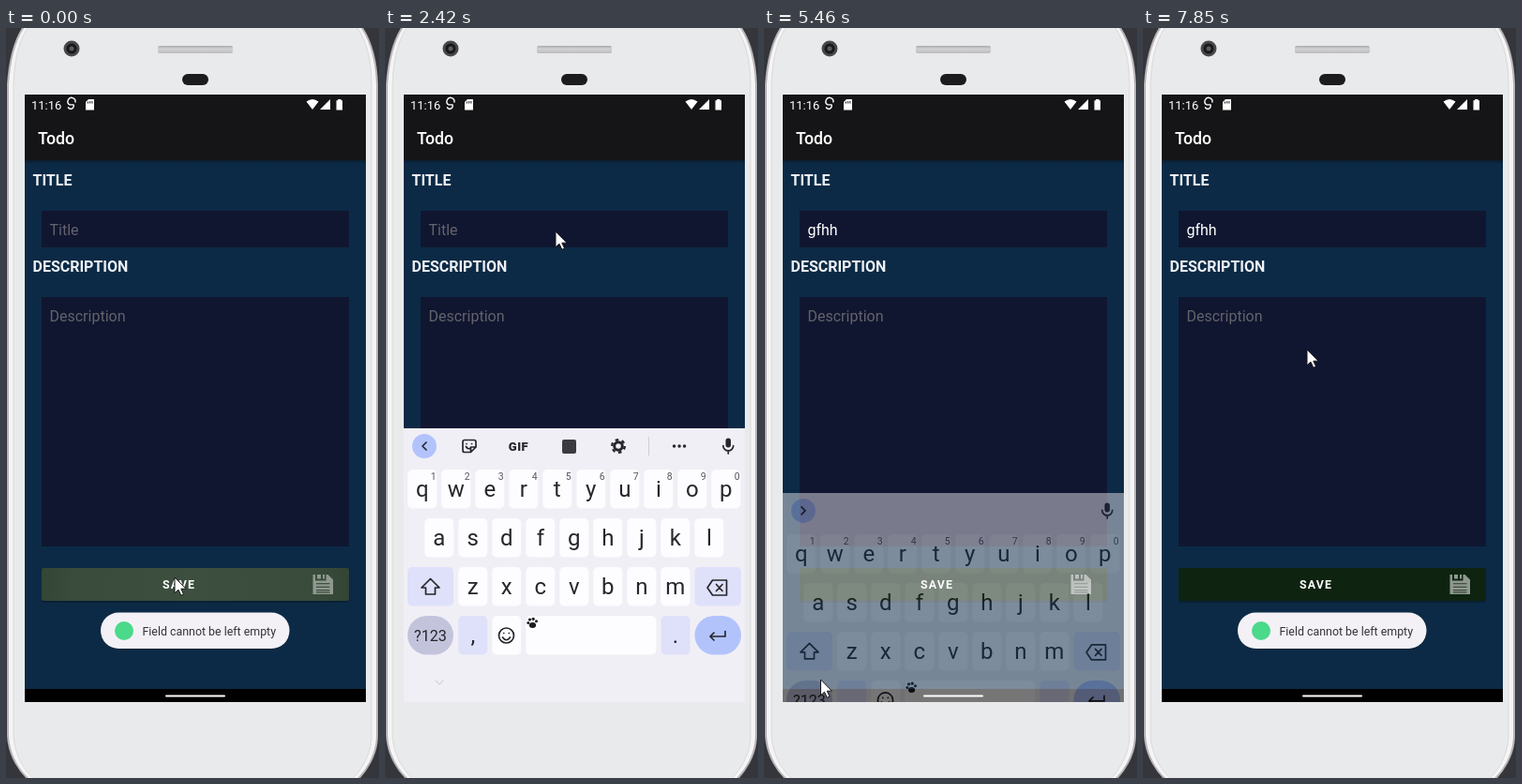
Recreate the animation shown at these times as an HTML page. Size 398 by 800 pixels, loop 8000 ms.

```html
<!DOCTYPE html>
<html lang="en">
<head>
<meta charset="utf-8">
<title>Todo form</title>
<style>
  html, body { margin: 0; width: 100%; height: 100%; overflow: hidden; background: #34363b; }
  svg { display: block; width: 100%; height: 100%; }
  text { font-family: Roboto, "Noto Sans", sans-serif; font-size: 16px; white-space: pre; }
  .mid { text-anchor: middle; }
  .line { fill: none; stroke: #26262b; stroke-width: 1.7; stroke-linejoin: round; stroke-linecap: round; }
  #keys .key { font-size: 24px; }
  #keys .hint { font-size: 10.5px; fill: #55555c; }
</style>
</head>
<body>
<svg viewBox="0 0 398 800" preserveAspectRatio="none">
  <defs>
    <clipPath id="screen"><path d="M20 71H384V719H20Z"/></clipPath>
    <linearGradient id="slot" x2="0" y2="1">
      <stop stop-color="#a9a9ac"/><stop offset=".4" stop-color="#d2d2d4"/><stop offset="1" stop-color="#bcbcbf"/>
    </linearGradient>
    <linearGradient id="shade" x2="0" y2="1">
      <stop stop-color="#000" stop-opacity=".3"/><stop offset="1" stop-color="#000" stop-opacity="0"/>
    </linearGradient>
    <radialGradient id="glow" gradientUnits="userSpaceOnUse" cx="200" cy="594" r="190">
      <stop stop-color="#fff" stop-opacity=".24"/><stop offset=".5" stop-color="#fff" stop-opacity=".22"/>
      <stop offset="1" stop-color="#fff" stop-opacity=".1"/>
    </radialGradient>
  </defs>

  <!-- phone -->
  <path d="M2 60C4 30 10 8 24-8H374C388 8 395 30 396 60V755C396 775 384 795 370 806H30C14 795 3 775 2 755Z" fill="#f5f5f6" stroke="#b9b5b8" stroke-width="2"/>
  <path d="M8 60C9 30 15 8 29-8H369C383 8 390 30 390 60V755C390 775 378 795 364 806H36C20 795 9 775 8 755Z" fill="#e9eaec" stroke="#d9d9dc"/>
  <circle cx="70" cy="22" r="8.5" fill="#48484b"/>
  <circle cx="70" cy="22" r="5.5" fill="#19191c"/>
  <circle cx="70" cy="22" r="2.5" fill="#5b5b62"/>
  <rect x="162" y="19" width="80" height="8" rx="2" fill="url(#slot)"/>
  <rect x="188" y="49" width="28" height="12" rx="6" fill="#1c1b1e"/>

  <g clip-path="url(#screen)">
    <path d="M20 71H384V719H20Z" fill="#0c2a45"/>
    <path d="M20 71H384V141H20Z" fill="#151517"/>
    <path d="M20 141H384V145H20Z" fill="url(#shade)"/>

    <!-- status bar -->
    <g fill="#fff">
      <text x="27" y="86.6" style="font-size:13px">11:16</text>
      <path d="M73.8 79.5A4 4 0 1 0 68 81.9H72A2.5 2.5 0 1 1 66.2 84.4" fill="none" stroke="#fff" stroke-width="1.4"/>
      <path d="M88 76H94V87.5H85V79Z"/>
      <path d="M87.5 78.5V80.5M89.7 78V80.5M91.9 78V80.5" stroke="#151517"/>
      <path d="M320.500 78.500Q327 73.500 333.500 78.500L327 87Z"/>
      <path d="M346 76V87H335Z"/>
      <path d="M354 76H357.500V77.200H359V87.500H352.500V77.200H354Z"/>
      <text x="34" y="124" style="font-size:17.7px;font-weight:500">Todo</text>
    </g>

    <!-- form -->
    <g fill="#eef1f6" font-weight="700">
      <text x="28.500" y="168">TITLE</text>
      <text x="28.500" y="260">DESCRIPTION</text>
    </g>
    <path d="M38 195H366V234H38ZM38 287H366V553H38Z" fill="#101630"/>
    <text id="title" x="46.500" y="221">Title</text>
    <path id="under" fill="none" stroke="#e8e8ee"/>
    <text x="46.500" y="313" fill="#64636c">Description</text>
    <path id="caret" stroke="#dfe3ea" fill="none"/>

    <rect x="38" y="577.500" width="328" height="35.500" rx="2" fill="#000" opacity=".25"/>
    <rect x="38" y="576" width="328" height="35" rx="2" fill="#0e2410"/>
    <rect id="ripple" x="38" y="576" width="328" height="35" rx="2" fill="url(#glow)"/>
    <text x="167" y="598.400" fill="#fff" style="font-size:12.4px;font-weight:700;letter-spacing:1.1px">SAVE</text>
    <g id="disk">
      <path d="M327.500 583H330V589.500H341.500V583H343.500L349 588.500V604H327.500Z" fill="#8f998f"/>
      <path d="M332 583H336V587.500H332ZM338 583H340V587.500H338Z" fill="#8f998f"/>
      <path d="M331 592.800H345.500M331 596.300H345.500M331 599.800H345.500M331 602H345.500" stroke="#2b3a2b" stroke-width="1.1"/>
    </g>

    <path d="M20 705H384V719H20Z" fill="#000"/>
    <rect x="170" y="711.500" width="64" height="2" rx="1" fill="#fff"/>

    <g id="toast">
      <rect x="101" y="624.500" width="201.500" height="38.500" rx="19.200" fill="#000" opacity=".2"/>
      <rect x="101" y="623.500" width="201.500" height="38.500" rx="19.200" fill="#f3f1f6"/>
      <g id="note">
        <circle cx="126" cy="643" r="10" fill="#4bd98a"/>
        <text x="145.500" y="647.600" fill="#333338" style="font-size:12.4px">Field cannot be left empty</text>
      </g>
    </g>

    <!-- keyboard -->
    <g id="board">
      <path d="M20 427H384V725H20Z" fill="#f1eff6"/>
      <circle cx="42" cy="446" r="13" fill="#b2c3fc"/>
      <path id="arrow" class="line"/>
      <g id="tools">
        <path class="line" d="M85 439.500H95Q97 439.500 97 441.500V447L91.500 452.500H85Q83 452.500 83 450.500V441.500Q83 439.500 85 439.500ZM91.500 452V447H97M86.500 446.500Q88 449.500 90.500 448.500M87 443.500H87.100M92.500 443.500H92.600"/>
        <text class="mid" x="142.500" y="450.700" fill="#26262b" style="font-size:13px;font-weight:900;letter-spacing:.5px">GIF</text>
        <rect x="189" y="439" width="15" height="15" rx="2" fill="#3b3b40"/>
        <circle class="line" cx="249" cy="446" r="4.300" style="stroke-width:3"/>
        <circle class="line" cx="249" cy="446" r="6.800" style="stroke-width:2.4;stroke-linecap:butt" stroke-dasharray="3.560 3.560"/>
        <path d="M281.500 436V456" stroke="#cfcdd6"/>
        <path class="line" d="M308.500 446H308.600M314 446H314.100M319.500 446H319.600" style="stroke-width:3.4"/>
      </g>
      <text id="guess" class="mid" x="201" y="452.500" fill="#26262b" style="font-size:16.400px"></text>
      <rect x="363.500" y="437.500" width="5.500" height="10" rx="2.750" fill="#26262b"/>
      <path class="line" d="M360.800 445.500A5.400 5.400 0 0 0 371.700 445.500M366.250 451V454"/>
      <g id="keys"></g>
      <path class="line" d="M48.500 587.500L58 597H53.500V604H43.500V597H39Z"/>
      <path class="line" d="M349.500 589H364.500V605H349.500L344 597ZM353.500 593.500L360 600.500M360 593.500L353.500 600.500"/>
      <g class="line">
        <circle cx="129.500" cy="648" r="8"/>
        <path d="M125.500 650Q129.500 655.500 133.500 650M126.700 645.500H126.800M132.300 645.500H132.400"/>
      </g>
      <g fill="#1d1d21">
        <ellipse cx="157.500" cy="637" rx="3.600" ry="3"/>
        <circle cx="152.800" cy="634.500" r="1.500"/><circle cx="154.500" cy="631" r="1.600"/>
        <circle cx="158.200" cy="630.300" r="1.600"/><circle cx="161.500" cy="632.800" r="1.500"/>
      </g>
      <path class="line" d="M363 643.500V649H347M351 645L347 649L351 653"/>
      <circle id="press" cx="58" cy="698" r="36" fill="#55555f"/>
      <path id="down" class="line" d="M54 696L58 700L62 696" style="stroke:#6b6b72;stroke-width:1.300"/>
      <g id="dots" stroke="#6b6b72" fill="none">
        <path d="M339.500 694.500H353M339.500 697.500H353M339.500 700.500H342M351 700.500H353" stroke-width="1.600" stroke-dasharray="1.700 1.100"/>
        <path d="M343 700.500H350" stroke-width="1.600"/>
      </g>
    </g>
    <rect id="pill" x="170" y="711.500" width="64" height="2" rx="1" fill="#5c5b62"/>
  </g>

  <path id="mouse" d="M0 0V16.800L4 13.200L6.800 19.300L9.500 18.100L6.800 12.200H12Z" fill="#fff" stroke="#15151a"/>
</svg>
<script>
const $ = id => document.getElementById(id);
const set = (id, attrs) => { for (const a in attrs) $(id).setAttribute(a, attrs[a]); };

// keyboard keys
let html = '';
const key = (x, y, w, fill, label = '', size = 24, rx = 5) => {
  html += `<rect x="${x}" y="${y}" width="${w}" height="41.500" rx="${rx}" fill="${fill}"/>` +
    `<text class="key mid" x="${x + w / 2}" y="${y + (size < 20 ? 27 : 29)}" fill="#26262b" style="font-size:${size}px">${label}</text>`;
};
const white = '#fdfcff', lilac = '#dfe0fa';
[['qwertyuiop', 24.3, 471], ['asdfghjkl', 42.3, 523], ['zxcvbnm', 78.3, 575]].forEach(([row, x0, y], r) => {
  [...row].forEach((c, i) => {
    const x = x0 + i * 36;
    key(x, y, 31, white, c);
    if (!r) html += `<text class="hint mid" x="${x + 27.5}" y="${y + 11}">${(i + 1) % 10}</text>`;
  });
});
key(24, 575, 49, lilac);
key(330.5, 575, 49.5, lilac);
key(24, 627, 49, '#c3c4dc', '?123', 16.2, 20.7);
key(78.3, 627, 31, lilac, ',');
key(114.3, 627, 31, white);
key(150.3, 627, 139, white);
key(294.5, 627, 31, lilac, '.');
key(330.5, 627, 49.5, '#b2c3fc', '', 24, 20.7);
$('keys').innerHTML = html;

const ticks = [[0, 0, 1], [120, 390, 3], [690, 690, 1], [1120, 2150, 8], [2270, 2270, 1], [2420, 3240, 6],
  [3510, 3510, 1], [3780, 4050, 3], [4350, 4590, 3], [4710, 5340, 6], [5460, 6490, 8], [6640, 7040, 4], [7310, 7850, 5]]
  .flatMap(([a, b, n]) => Array.from({ length: n }, (_, i) => a + (n > 1 ? (b - a) * i / (n - 1) : 0)));

const linear = p => p, smooth = p => p * p * (3 - 2 * p);
const clamp = p => Math.min(1, Math.max(0, p));

// value at t along [time, value] points
function track(t, points, ease = linear) {
  let [a, v] = points[0];
  for (const [b, w] of points) {
    if (t < b) return b > a ? v + (w - v) * ease(clamp((t - a) / (b - a))) : v;
    a = b; v = w;
  }
  return v;
}
const within = (t, spans) => spans.some(([a, b]) => t >= a && t < b);

const path = [[1000, 180, 586], [1850, 183, 204], [2100, 182, 217], [4250, 182, 217], [4590, 88, 647],
  [5000, 60.5, 695], [5600, 60.5, 695], [6300, 175, 596], [7180, 175, 596], [7800, 175, 343]];
const along = (t, i) => track(t, path.map(p => [p[0], p[i]]), smooth);

function draw(t) {
  set('mouse', { transform: `translate(${along(t, 1)} ${along(t, 2)})` });

  // typed title
  const word = 'gfhh'.slice(0, [3510, 3780, 3920, 4050].filter(k => t >= k - 10).length);
  const widths = [0, 9, 14.5, 23.3, 32];
  const end = 46.5 + widths[word.length];
  const composing = word && t < 5340;
  $('title').textContent = word || 'Title';
  set('title', { fill: word ? '#fff' : '#64636c' });
  set('under', { d: composing ? `M46.5 222.500H${end}` : '' });
  $('guess').textContent = composing ? word : '';

  const inTitle = within(t, [[2560, 3060], [3510, 4430], [5000, 5340], [5740, 6240], [6760, 7310]]);
  const inText = within(t, [[200, 690], [1120, 1660], [7310, 7800]]);
  const x = word ? Math.floor(end) + .5 : 47.5;
  set('caret', { d: inTitle ? `M${x} 204V225` : inText ? 'M47.500 296V317' : '' });

  // button ripple
  set('ripple', { opacity: track(t, [[0, .82], [390, 0], [6300, 0], [6440, 1], [6560, 1], [7040, 0]]) });
  set('glow', { r: track(t, [[0, 260], [6300, 260], [6301, 60], [6490, 185], [6800, 260]]) });

  // toast
  const s = track(t, [[2000, 1], [2150, .955], [2270, .9], [6300, .9], [6490, .98], [6640, 1]]);
  set('toast', {
    opacity: track(t, [[2150, 1], [2250, 0], [6330, 0], [6450, 1]]),
    transform: `translate(201.75 642.75) scale(${s}) translate(-201.75 -642.75)`
  });
  set('note', { opacity: track(t, [[2000, 1], [2150, .1], [2200, 0], [6430, 0], [6490, .25], [6640, 1]]) });

  // keyboard slides and fades
  const rise = clamp((t - 2150) / 250), fall = clamp((t - 5340) / 247);
  const dy = 292 * ((1 - rise) ** 2 + fall ** 2);
  set('board', { transform: `translate(0 ${dy})`, opacity: Math.min(rise, fall ? 1 - fall * 1.1 : 1) });
  set('arrow', { d: word ? 'M40 442L44 446L40 450' : 'M44 442L40 446L44 450' });
  set('tools', { opacity: word ? 0 : 1 });

  const nav = track(t, [[3400, 0], [4050, 1]]);
  set('down', { opacity: .2 + .8 * nav });
  set('dots', { opacity: nav });
  set('pill', { opacity: rise < 1 || fall > 0 ? 0 : nav });
  set('press', { opacity: track(t, [[5050, 0], [5200, .14], [5340, .1], [5460, 0]]) });
}

function frame(now) {
  const t = now % 8000;
  draw(ticks.filter(k => k <= t).pop());
  requestAnimationFrame(frame);
}
draw(0);
requestAnimationFrame(frame);
</script>
</body>
</html>
```
